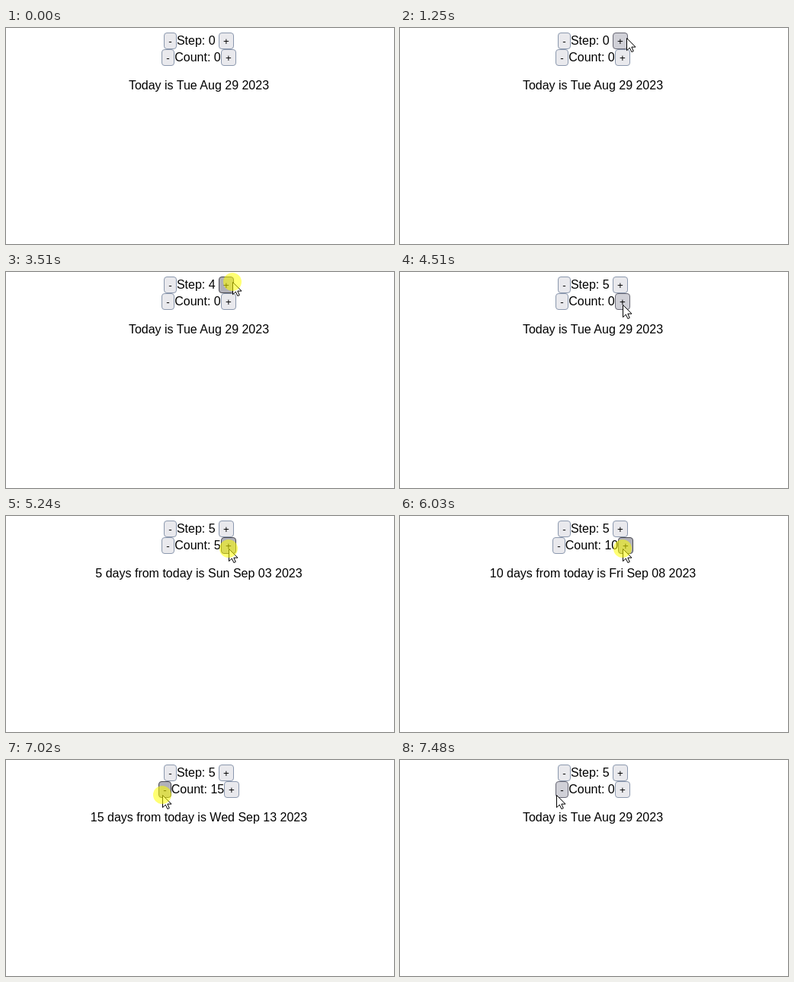
Recreate the animation shown at these times as an HTML page. Size 509x285 px, loop 8 s.

```html
<!DOCTYPE html>
<html lang="en">
<head>
<meta charset="utf-8">
<title>Date counter</title>
<style>
  html, body { margin: 0; width: 100%; height: 100%; overflow: hidden; background: #fff; }
  svg { display: block; width: 509px; height: 285px; }
  text { font: 16px "Liberation Sans", Arial, sans-serif; fill: #000; white-space: pre; }
  .button text { font-size: 13.333px; text-anchor: middle; }
  .button rect { fill: #e9e9ed; stroke: #8b98ae; }
  .button.hover rect { fill: #d0d0d7; stroke: #676774; }
  .button.active rect { fill: #b1b1b9; stroke: #484851; }
</style>
</head>
<body>
<svg viewBox="0 0 509 285">
  <text id="date" x="253" y="81" text-anchor="middle"></text>
  <g id="rows"></g>
  <g id="pointer">
    <path d="M.5 .5V16.7L4.3 13.1L6.9 18.6L9.3 17.5L6.8 12.1H12Z" fill="#fff" stroke="#000"/>
    <circle id="click" r="12" fill="#ff0" fill-opacity=".55"/>
  </g>
</svg>
<script>
const LOOP = 8000;
const TICK = 66;
const HOLD = 130;
const CENTER = 253;
const BUTTON_HEIGHT = 22;
const BASELINE = 16;
const WIDTHS = { "-": 17, "+": 20 };

const ENTRY = { x: 470, y: 283 };
const GLIDES = [
  { start: 390, ticks: 10, x: 297, y: 13 },
  { start: 3774, ticks: 4, x: 294, y: 50 },
  { start: 4244, ticks: 4, x: 292, y: 43 },
  { start: 6224, ticks: 4, x: 208, y: 50 },
  { start: 6488, ticks: 4, x: 205, y: 46 }
];

const CLICKS = [
  { counter: "step", change: 1, times: [1510, 2040, 2640, 3310, 3510] },
  { counter: "count", change: 5, times: [4640, 5240, 6030] },
  { counter: "count", change: -5, times: [6950, 7150, 7350] }
];

const byId = id => document.getElementById(id);

function set(node, attrs) {
  for (const key in attrs) node.setAttribute(key, attrs[key]);
}

function add(parent, tag, attrs = {}) {
  const node = document.createElementNS("http://www.w3.org/2000/svg", tag);
  set(node, attrs);
  return parent.appendChild(node);
}

function makeButton(parent, sign, top) {
  const group = add(parent, "g");
  const rect = add(group, "rect", { y: top + .5, height: BUTTON_HEIGHT - 1, rx: 3.5 });
  const text = add(group, "text", { y: top + BASELINE });
  text.textContent = sign;
  return { group, rect, text, top, width: WIDTHS[sign] };
}

function makeRow(counter, title, top, gap) {
  const parent = byId("rows");
  return {
    counter, title, gap,
    minus: makeButton(parent, "-", top),
    label: add(parent, "text", { y: top + BASELINE }),
    plus: makeButton(parent, "+", top)
  };
}

const rows = [makeRow("step", "Step", 6, 4.45), makeRow("count", "Count", 28, 0)];

function placeButton({ group, rect, text, top, width }, x, mouse, down) {
  const left = Math.round(x);
  set(rect, { x: left + .5, width: width - 1 });
  set(text, { x: left + width / 2 });
  const hover = mouse && mouse.x >= left && mouse.x < left + width &&
    mouse.y >= top && mouse.y < top + BUTTON_HEIGHT;
  set(group, { class: "button" + (hover ? (down ? " active" : " hover") : "") });
}

function placeRow({ title, gap, minus, label, plus }, value, mouse, down) {
  label.textContent = `${title}: ${value}`;
  const inner = label.getComputedTextLength() + gap;
  const left = CENTER - (minus.width + inner + plus.width) / 2;
  placeButton(minus, left, mouse, down);
  set(label, { x: left + minus.width });
  placeButton(plus, left + minus.width + inner, mouse, down);
}

function dateLine(days) {
  const date = new Date(2023, 7, 29 + days).toDateString();
  return days ? `${days} days from today is ${date}` : `Today is ${date}`;
}

// Vertical travel runs slightly ahead of horizontal, which bends the path.
function mouseAt(time) {
  if (time < GLIDES[0].start) return null;
  let { x, y } = ENTRY;
  for (const glide of GLIDES) {
    if (time < glide.start) break;
    const p = Math.min(1, Math.floor((time - glide.start) / TICK) / glide.ticks);
    const eased = p * p * (3 - 2 * p);
    x += (glide.x - x) * eased ** 1.25;
    y += (glide.y - y) * eased;
  }
  return { x: Math.round(x), y: Math.round(y) };
}

function draw(time) {
  const values = { step: 0, count: 0 };
  let down = false;
  for (const { counter, change, times } of CLICKS) {
    for (const press of times) {
      if (time >= press + HOLD) values[counter] += change;
      else if (time >= press) down = true;
    }
  }
  const mouse = mouseAt(time);

  for (const row of rows) placeRow(row, values[row.counter], mouse, down);
  byId("date").textContent = dateLine(values.count);
  set(byId("click"), { visibility: down ? "inherit" : "hidden" });
  set(byId("pointer"), {
    visibility: mouse ? "visible" : "hidden",
    transform: mouse ? `translate(${mouse.x} ${mouse.y})` : ""
  });
}

const start = performance.now();
function tick() {
  draw((performance.now() - start) % LOOP);
  requestAnimationFrame(tick);
}
tick();
</script>
</body>
</html>
```
